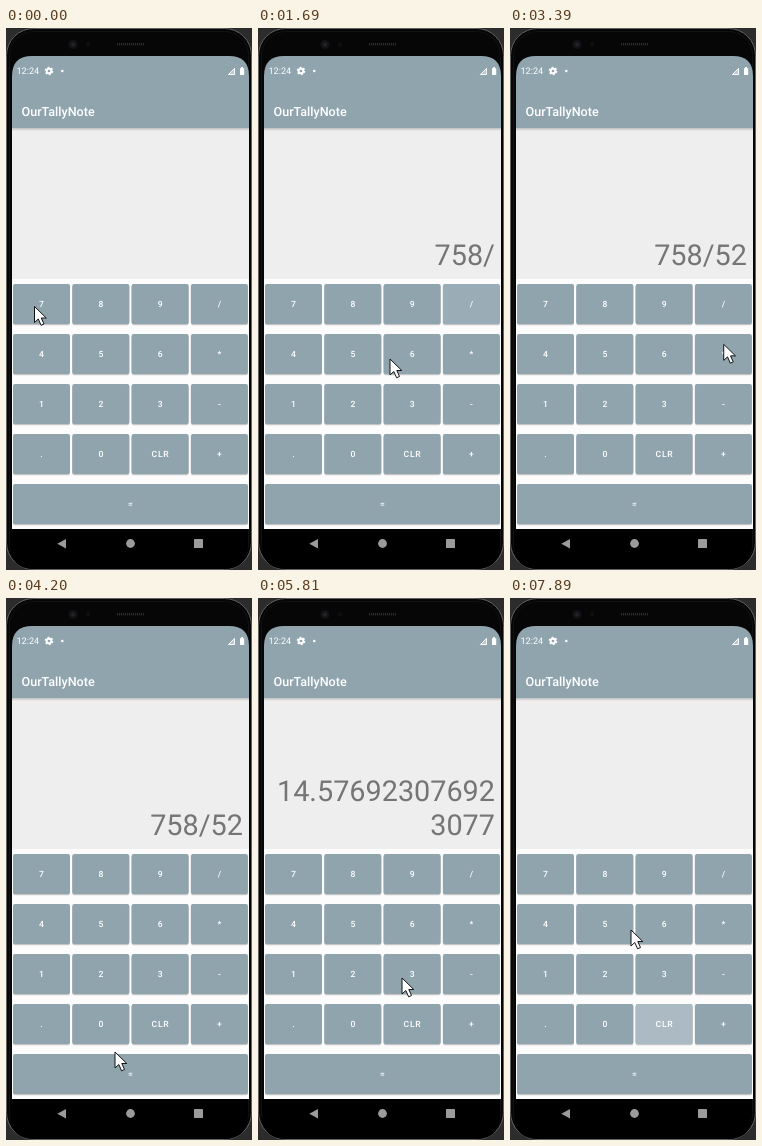
Animation of 246 by 542 pixels, one loop 8000 ms. Source, as an HTML page:

```html
<!DOCTYPE html>
<html lang="en">
<head>
<meta charset="utf-8">
<title>Calculator demo</title>
<style>
  html, body { margin: 0; width: 100%; height: 100%; overflow: hidden; background: #000; }
  svg { display: block; width: 246px; height: 542px; font-family: Roboto, sans-serif; text-rendering: geometricPrecision; }
  .key { fill: #fff; font-size: 8.6px; font-weight: 500; letter-spacing: .75px; text-anchor: middle; }
  .out { fill: #757575; font-size: 28.8px; text-anchor: end; }
</style>
</head>
<body>
<svg viewBox="0 0 246 542">
  <defs>
    <linearGradient id="fade" x2="0" y2="1">
      <stop stop-opacity=".2"/>
      <stop offset="1" stop-opacity="0"/>
    </linearGradient>
  </defs>
  <rect width="246" height="542" fill="#2c2c2c"/>
  <rect x=".5" y=".5" width="245" height="541" rx="27" fill="#060606" stroke="#626262"/>
  <rect x="3.5" y="3.500" width="239" height="535" rx="24" fill="none" stroke="#121212"/>
  <circle cx="67" cy="16.500" r="4.500" fill="#131315"/>
  <circle cx="67" cy="16.500" r="2" fill="#202329"/>
  <circle cx="82" cy="16.500" r="2.200" fill="#0e0f10"/>
  <path d="M111 16.300H138" stroke="#2b2b2b" stroke-width="2.500" stroke-dasharray="1.200 .8"/>

  <rect x="6" y="100" width="237" height="401" fill="#fcfcfc"/>
  <rect x="6" y="100" width="237" height="151" fill="#eee"/>
  <path d="M6 100V48Q6 28 26 28H223Q243 28 243 48V100Z" fill="#90a4ae"/>
  <rect x="6" y="100" width="237" height="3" fill="url(#fade)"/>
  <g fill="#fff">
    <text x="10.500" y="46.300" font-size="9.100">12:24</text>
    <text x="15.500" y="87.500" font-size="12.600" font-weight="500">OurTallyNote</text>
    <circle cx="43" cy="43" r="2.300" fill="none" stroke="#fff" stroke-width="1.900"/>
    <circle cx="43" cy="43" r="3.700" fill="none" stroke="#fff" stroke-width="1.200" stroke-dasharray="1.937"/>
    <circle cx="56.300" cy="43" r="1.300"/>
    <path d="M229 39.500V47H221.500Z" opacity=".4"/>
    <path d="M228.500 40.500V46.500H222.500Z" fill="none" stroke="#fff" stroke-width=".9"/>
    <path d="M234 40.200H235.200V39H237V40.200H238.200V47H234Z"/>
  </g>
  <g id="keys"></g>
  <text class="out" x="237" y="202.500" id="upper"></text>
  <text class="out" x="237" y="236.500" id="lower"></text>

  <path d="M4 501H242V515Q242 541 219 541H27Q4 541 4 515Z"/>
  <g fill="#9b9b9b">
    <path d="M60 511V520.500L51.300 515.700Z"/>
    <circle cx="124.500" cy="515.500" r="4.400"/>
    <rect x="188" y="511" width="9" height="9" rx=".6"/>
  </g>
  <path id="cursor" d="M0 0V16L3.800 12.500L6.600 18.800L9.500 17.500L6.800 11.500H11.800Z" fill="#fff" stroke="#111" stroke-linejoin="round"/>
</svg>
<script>
const LOOP = 8000, TICK = 138.3, LINE = 14;
const $ = id => document.getElementById(id);

function add(tag, attrs, text = '') {
  const el = document.createElementNS('http://www.w3.org/2000/svg', tag);
  for (const k in attrs) el.setAttribute(k, attrs[k]);
  el.textContent = text;
  $('keys').append(el);
  return el;
}

const keys = {};
function addKey(label, x, y, width) {
  const box = { x, y, width, height: 40, rx: 2 };
  add('rect', { ...box, y: y + 1.500, fill: '#000', opacity: .1 });
  add('rect', { ...box, y: y + .7, fill: '#000', opacity: .18 });
  add('rect', { ...box, fill: '#90a4ae' });
  const glow = add('rect', { ...box, fill: '#fff', opacity: 0 });
  const cx = x + width / 2;
  add('text', { class: 'key', x: cx + .4, y: y + 23.300 }, label);
  keys[label] = { glow, tip: [cx - 7, y + 22.500] };
}
['789/', '456*', '123-', ['.', '0', 'CLR', '+']].forEach((row, r) =>
  [...row].forEach((label, c) => addKey(label, 7 + c * 59.300, 256 + r * 50, 57)));
addKey('=', 7, 456, 235);

// Pointer stops: tick, then a key to press or a point to pass.
const stops = [
  [1, '7'], [3, '5'], [5, '8'], [7, [176, 333]],
  [9, '/'], [12, [132, 331]], [14, '5'], [16, '2'], [18, [107, 408]],
  [25, [220, 311]], [28, [77, 400]], [30, [109, 454]], [34, '='],
  [38, keys['='].tip], [42, [144, 380]], [47, [144, 380]],
  [51, [227, 336]], [56, 'CLR'], [57, [121, 332]]
].map(([at, goal]) => ({ at, key: keys[goal] && goal, tip: keys[goal]?.tip ?? goal }));

function pointerAt(tick) {
  const i = Math.max(0, stops.findLastIndex(s => s.at <= tick));
  const a = stops[i], b = stops[i + 1] ?? a;
  const u = Math.max(0, (tick - a.at) / (b.at - a.at || 1));
  const k = u * u * (3 - 2 * u);
  return a.tip.map((v, j) => v + (b.tip[j] - v) * k);
}

function enter(value, key) {
  if (key === 'CLR') return '';
  if (key !== '=') return value + key;
  const [a, b] = value.split('/');
  return String(a / b);
}

// Ripple: bright for three ticks, then one faint tick.
const ripple = age => age < 0 || age > 3 ? 0 : age < 3 ? .25 : .09;

function draw(time) {
  const tick = Math.floor((time % LOOP) / TICK + .215);
  $('cursor').setAttribute('transform', `translate(${pointerAt(tick)})`);

  let value = '';
  const level = {};
  for (const { at, key } of stops) {
    if (!key) continue;
    if (at < tick) value = enter(value, key);
    level[key] = Math.max(level[key] ?? 0, ripple(tick - at));
  }
  for (const key in level) keys[key].glow.setAttribute('opacity', level[key]);

  const wraps = value.length > LINE;
  $('upper').textContent = wraps ? value.slice(0, LINE) : '';
  $('lower').textContent = wraps ? value.slice(LINE) : value;
}

const start = performance.now();
function frame() {
  draw(performance.now() - start);
  requestAnimationFrame(frame);
}
frame();
</script>
</body>
</html>
```
